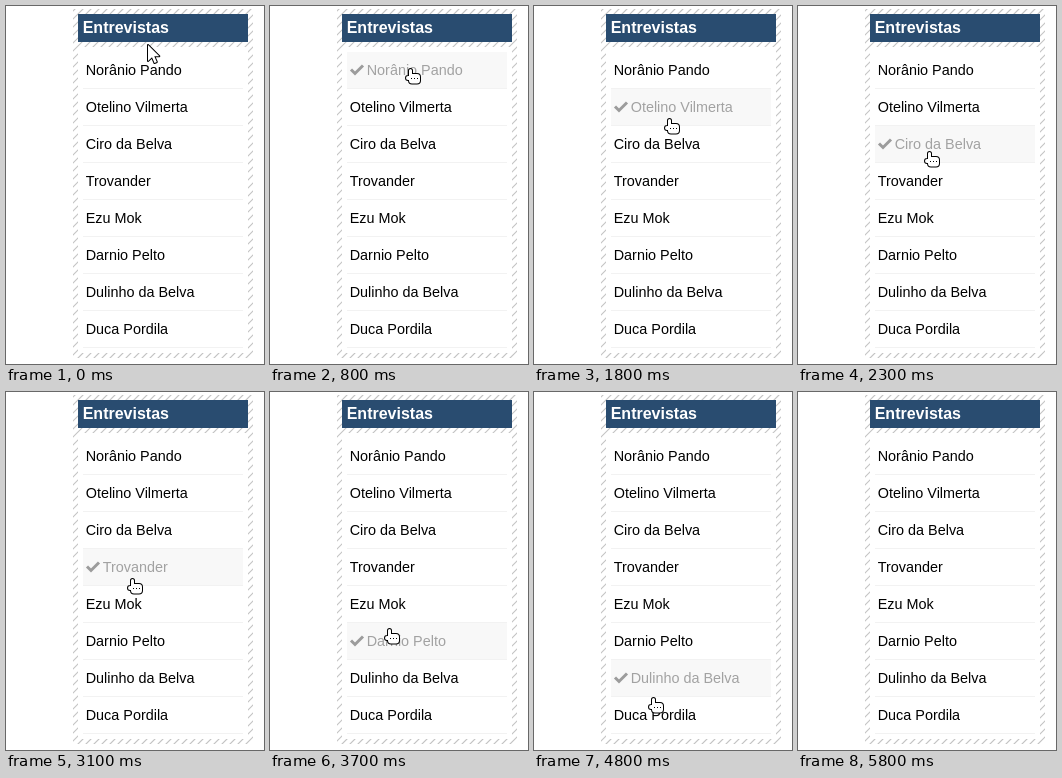
An HTML page with a canvas that plays this animation: 258 by 358 pixels, repeating every 7600 ms.

```html
<!DOCTYPE html>
<html lang="pt">
<head>
<meta charset="utf-8">
<style>
html, body { margin: 0; width: 100%; height: 100%; overflow: hidden; background: #fff; }
canvas { display: block; }
</style>
</head>
<body>
<canvas id="stage" width="258" height="358"></canvas>
<script>
const ctx = document.getElementById('stage').getContext('2d');
const LOOP = 7600, STEP = 100, POINTER_END = 5800;
const LIST_TOP = 46, ROW = 37, POINTER_TOP = 38;
const FONT = '"Liberation Sans", Arial, sans-serif';
const people = [
  'Norânio Pando', 'Otelino Vilmerta', 'Ciro da Belva', 'Trovander',
  'Ezu Mok', 'Darnio Pelto', 'Dulinho da Belva', 'Duca Pordila'
];

// Downward moves of the pointer: start, end, height reached; it rests in between
const moves = [
  [300, 800, 61], [800, 1100, 82], [1100, 1800, 111], [1800, 2400, 150],
  [2500, 2600, 177], [3000, 3700, 235], [3700, 4300, 278],
  [4600, 5000, 329], [5200, 5400, 345], [5600, 5700, 352]
];

const clamp01 = v => Math.min(1, Math.max(0, v));

function pointerAt(time) {
  const y = moves.reduce((from, [start, end, to]) =>
    from + (to - from) * clamp01((time - start) / (end - start)), POINTER_TOP);
  // Drifts left in a shallow curve, then slides away along the bottom edge
  const drift = 22 * clamp01((y - POINTER_TOP) / 198) ** 1.3;
  const slide = 2 * Math.max(0, y - 345);
  return { x: Math.round(141 - drift - slide), y: Math.round(y) };
}

function arrowShape() {
  return new Path2D('M1 1V17L5 13.3L7.5 19L9.8 18L7.3 12.3H12.3Z');
}

function handShape() {
  const shape = new Path2D();
  shape.roundRect(-1, 2, 3, 11, 1.5);
  shape.roundRect(-1, 7, 11, 9.5, 3);
  shape.roundRect(-4, 9, 6, 4, 2);
  return shape;
}

function rect(color, x, y, w, h) {
  ctx.fillStyle = color;
  ctx.fillRect(x, y, w, h);
}

function text(str, x, y, font, color) {
  ctx.font = font + ' ' + FONT;
  ctx.fillStyle = color;
  ctx.fillText(str, x, y);
}

function stroke(shape, color, width) {
  ctx.strokeStyle = color;
  ctx.lineWidth = width;
  ctx.stroke(shape);
}

function drawFrame() {
  rect('#fff', 0, 0, 258, 358);
  ctx.save();
  ctx.beginPath();
  ctx.rect(67, 3, 180, 349);
  ctx.clip();
  const hatch = new Path2D();
  for (let sum = 72; sum < 600; sum += 8) {
    hatch.moveTo(sum, 0);
    hatch.lineTo(sum - 358, 358);
  }
  stroke(hatch, '#c4c4c4', 1.2);
  ctx.restore();
  rect('#fff', 72, 41, 170, 306);
  rect('#294c70', 72, 8, 170, 28);
  text('Entrevistas', 76.7, 27, 'bold 16px', '#fff');
}

function drawRow(name, i, hovered) {
  const y = LIST_TOP + i * ROW;
  if (hovered) {
    rect('#f8f8f8', 77, y, 160, ROW - 1);
    stroke(new Path2D(`M81 ${y + 17.5}l4 4l8-8`), '#9c9c9c', 3);
  }
  rect('#f2f2f2', 77, y + ROW - 1, 160, 1);
  text(name, hovered ? 96.7 : 79.7, y + 23, '14.4px', hovered ? '#a2a2a2' : '#000');
}

function drawPointer({ x, y }, isHand) {
  const shape = isHand ? handShape() : arrowShape();
  ctx.save();
  ctx.translate(x, y);
  ctx.lineJoin = 'round';
  stroke(shape, '#000', 2);
  ctx.fillStyle = '#fff';
  ctx.fill(shape);
  if (isHand) for (let dx = 1; dx < 9; dx += 3) rect('#000', dx, 11, 1, 1);
  ctx.restore();
}

function draw(now) {
  const time = Math.floor((now % LOOP) / STEP) * STEP;
  const pointer = time < POINTER_END ? pointerAt(time) : null;
  const active = pointer ? Math.floor((pointer.y - 2 - LIST_TOP) / ROW) : -1;
  drawFrame();
  people.forEach((name, i) => drawRow(name, i, i === active));
  if (pointer) drawPointer(pointer, active in people);
}

const start = performance.now();
function tick() {
  draw(performance.now() - start);
  requestAnimationFrame(tick);
}
tick();
</script>
</body>
</html>
```
